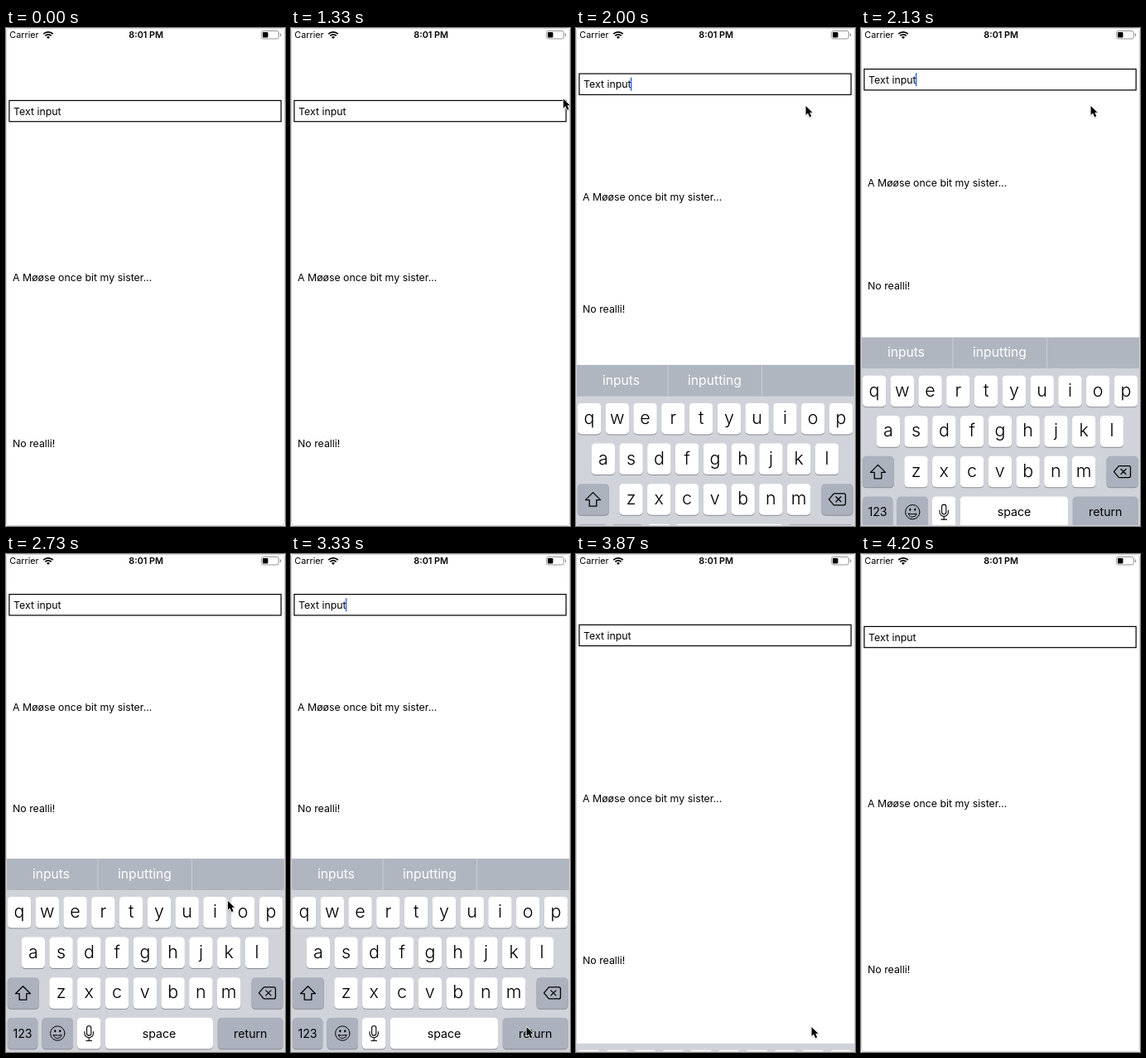
These frames come from a looping animation (337x600 px, 5190 ms). An HTML page with a canvas:

```html
<!DOCTYPE html>
<html lang="en">
<head>
<meta charset="utf-8">
<title>Keyboard avoiding inputs</title>
<style>
html, body { margin: 0; width: 100%; height: 100%; overflow: hidden; background: #fff; }
canvas { display: block; }
</style>
</head>
<body>
<canvas id="stage" width="337" height="600"></canvas>
<script>
const ctx = document.getElementById('stage').getContext('2d');
const LOOP = 5190, W = 337, H = 600;
const BOARD = 233, BAR = 38, KEYS = BOARD - BAR, BAR_DROP = 280;
const FACE = '#fff', DARK = '#abb1bd', INK = '#000';

const clamp = v => Math.max(0, Math.min(1, v));
const ramp = (t, from, to) => clamp((t - from) / (to - from));
const smooth = u => u * u * (3 - 2 * u);
const mix = (a, b, u) => a + (b - a) * u;

// Critically damped spring from 0 to 1
function spring(t, start) {
  const x = Math.max(0, t - start) * 0.01826;
  return 1 - (1 + x) * Math.exp(-x);
}

function text(str, x, y, size, { weight = 400, color = INK, align = 'left' } = {}) {
  ctx.font = `${weight} ${size}px Inter, Roboto, sans-serif`;
  ctx.textAlign = align;
  ctx.fillStyle = color;
  ctx.fillText(str, x, y);
}

function rect(x, y, w, h, color) {
  ctx.fillStyle = color;
  ctx.fillRect(x, y, w, h);
}

function round(x, y, w, h, r, color) {
  ctx.beginPath();
  ctx.roundRect(x, y, w, h, r);
  ctx.fillStyle = color;
  ctx.fill();
}

function stroke(d, x, y, width = 1.3) {
  ctx.save();
  ctx.translate(x, y);
  ctx.lineWidth = width;
  ctx.lineJoin = ctx.lineCap = 'round';
  ctx.strokeStyle = INK;
  ctx.stroke(new Path2D(d));
  ctx.restore();
}

function statusBar() {
  text('Carrier', 4.3, 12.3, 10.8);
  ctx.strokeStyle = INK;
  ctx.lineWidth = 1.7;
  for (const r of [8.2, 5.2]) {
    ctx.beginPath();
    ctx.arc(51, 13, r, -Math.PI * 0.75, -Math.PI * 0.25);
    ctx.stroke();
  }
  ctx.beginPath();
  ctx.moveTo(51, 13);
  ctx.arc(51, 13, 2.9, -Math.PI * 0.75, -Math.PI * 0.25);
  ctx.fillStyle = INK;
  ctx.fill();
  text('8:01 PM', 169.2, 12.3, 10.8, { weight: 600, align: 'center' });
  ctx.beginPath();
  ctx.roundRect(308.5, 3.5, 21, 9.5, 2.5);
  ctx.lineWidth = 0.9;
  ctx.strokeStyle = '#8c8c8c';
  ctx.stroke();
  round(310, 5, 6.5, 6.5, 1, INK);
  round(331, 6.5, 1.2, 3.5, 0.6, '#8c8c8c');
}

function content(height, caret) {
  const y = n => -height * n / 6;
  const top = y(1);
  ctx.strokeStyle = INK;
  ctx.lineWidth = 1.2;
  ctx.strokeRect(3.9, top + 87.4, 328.3, 25.3);
  text('Text input', 9, top + 104.7, 12.35);
  ctx.globalAlpha = caret;
  rect(65.8, top + 92, 1.6, 16, '#3c6cf0');
  ctx.globalAlpha = 1;
  text('A Møøse once bit my sister...', 8, y(3) + 305, 12.35);
  text('No realli!', 8, y(5) + 504.7, 12.35);
}

function key(x, y, w, color = FACE) {
  round(x, y + 1, w, 37.5, 4.5, '#898c92');
  round(x, y, w, 37.5, 4.5, color);
}

function suggestions(y) {
  rect(0, y, W, BAR, '#b0b6c0');
  for (const x of [110.5, 224]) rect(x, y, 1, BAR, '#c9cdd4');
  const style = { color: '#fff', align: 'center' };
  text('inputs', 54.5, y + 23.7, 15.7, style);
  text('inputting', 167.5, y + 23.7, 15.7, style);
}

function keys(y, pressed) {
  rect(0, y, W, KEYS, '#d0d3da');
  ['qwertyuiop', 'asdfghjkl', 'zxcvbnm'].forEach((row, r) => {
    const left = [16, 32.8, 66.5][r], top = y + 8 + r * 48.6;
    [...row].forEach((ch, i) => {
      const x = left + i * 33.78;
      key(x - 14.2, top, 28.4);
      text(ch, x, top + 25.2, 21.5, { weight: 300, align: 'center' });
    });
  });

  const third = y + 105.2, last = y + 153.8, mid = last + 18.7;
  key(1.8, third, 38, DARK);
  stroke('M0-9L9 0H4.3V7.5H-4.3V0H-9Z', 20.5, third + 19.5);
  key(296.6, third, 38, DARK);
  stroke('M-10 0L-4-7H8Q10-7 10-5V5Q10 7 8 7H-4ZM-1.5-3L4.5 3M4.5-3L-1.5 3', 315.5, third + 18.7);

  key(1.8, last, 36.5, DARK);
  text('123', 20, mid + 5, 14.2, { align: 'center' });
  key(43.5, last, 37.5, DARK);
  stroke('M8.7 0A8.7 8.7 0 1 1-8.7 0A8.7 8.7 0 1 1 8.7 0M-5 2Q0 3.2 5 2Q4 6 0 6T-5 2', 62.3, mid, 1);
  for (const x of [59.3, 65.3]) round(x - 1, mid - 4.3, 2, 3, 1, INK);
  key(86, last, 28.4);
  stroke('M-2.6-6.4A2.6 2.6 0 0 1 2.6-6.4V0A2.6 2.6 0 0 1-2.6 0ZM-5.2-2V0A5.2 5.2 0 0 0 5.2 0V-2M0 5.2V9M-3.3 9H3.3', 100.2, mid, 1.1);
  key(119.8, last, 130.2);
  text('space', 185, mid + 5, 14.2, { align: 'center' });
  key(255.8, last, 78.7, pressed ? FACE : DARK);
  text('return', 295.3, mid + 5, 14.2, { align: 'center' });
}

function pointer(t) {
  if (t < 1330 || t >= 4200) return;
  const enter = 1 - (1 - ramp(t, 1330, 1470)) ** 2;
  const down = smooth(ramp(t, 2270, 3010));
  const leave = smooth(ramp(t, 3870, 4130));
  let x = mix(329.8, 277.6, enter), y = mix(85.5, 94, enter);
  if (down) {
    x = mix(mix(277.6, 248, down), mix(248, 284.6, down), down);
    y = mix(94, 570, down);
  }
  x += 34 * leave;
  y -= 3 * leave;
  ctx.save();
  ctx.translate(x, y);
  const arrow = new Path2D('M0 0V10.8L2.5 8.5L4.6 13.2L6.6 12.3L4.7 7.7H8Z');
  ctx.lineWidth = 1.6;
  ctx.lineJoin = 'round';
  ctx.strokeStyle = '#fff';
  ctx.shadowColor = 'rgba(0,0,0,.3)';
  ctx.shadowBlur = 1.5;
  ctx.shadowOffsetY = 0.6;
  ctx.stroke(arrow);
  ctx.shadowColor = 'transparent';
  ctx.fillStyle = INK;
  ctx.fill(arrow);
  ctx.restore();
}

function frameEdge() {
  ctx.beginPath();
  ctx.roundRect(0.5, 0.5, W - 1, H - 1, 3);
  ctx.lineWidth = 1;
  ctx.strokeStyle = '#d2d2d2';
  ctx.stroke();
}

function draw(now) {
  const t = now % LOOP;
  const show = spring(t, 1824), hide = spring(t, 3614.5);
  const blink = ramp(t, 1720, 1800) - ramp(t, 2330, 2530)
    + ramp(t, 2800, 3000) - ramp(t, 3320, 3530);

  rect(0, 0, W, H, '#fff');
  statusBar();
  content(BOARD * show * (1 - hide), clamp(blink));
  if (t > 1824 && t < 4200) {
    const top = H - BOARD * show;
    suggestions(top + BAR_DROP * hide);
    keys(top + BAR + KEYS * hide, t >= 3400 && t < 3530);
  }
  frameEdge();
  pointer(t);
  requestAnimationFrame(() => draw(performance.now() - begin));
}

const begin = performance.now();
draw(0);
</script>
</body>
</html>
```
